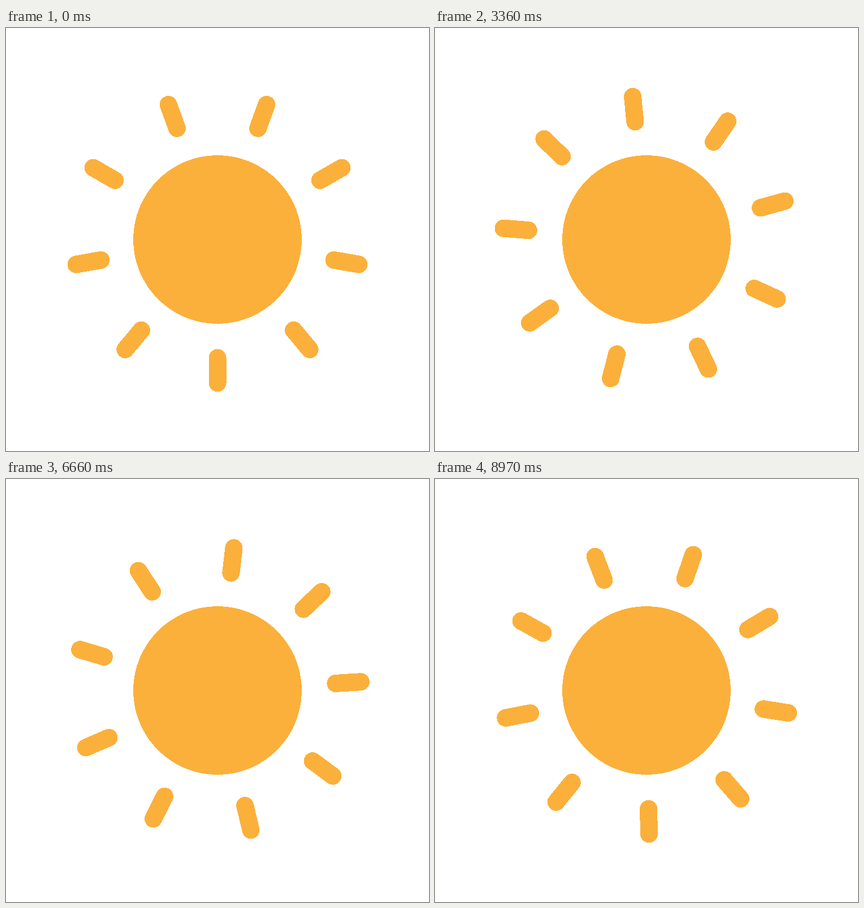
These frames come from a looping animation (748x748 px, 9000 ms). An HTML page:

```html
<!DOCTYPE html>
<html lang="en">
<head>
<meta charset="utf-8">
<title>Sun</title>
<style>
  html, body { margin: 0; width: 100%; height: 100%; overflow: hidden; background: #fff; }
  svg { display: block; width: 100%; height: 100%; }
</style>
</head>
<body>
<svg viewBox="-374 -374 748 748" fill="#fbb03b" stroke="#fbb03b" shape-rendering="crispEdges">
  <circle r="149" stroke="none"/>
  <g id="rays" stroke-width="31" stroke-linecap="round"></g>
</svg>
<script>
  const RAYS = 9, STEP = 30, STEPS = 300;
  const rays = document.getElementById('rays');

  rays.innerHTML = Array.from({ length: RAYS }, (_, i) =>
    `<path d="M0 209.3V253.8" transform="rotate(${i * 360 / RAYS})"/>`).join('');

  // The turn advances in 30 ms steps, from 0 to 359 degrees per loop.
  const start = performance.now();
  function draw(now) {
    const step = Math.floor(Math.max(0, now - start) / STEP) % STEPS;
    rays.setAttribute('transform', `rotate(${step * 359 / (STEPS - 1)})`);
    requestAnimationFrame(draw);
  }
  draw(start);
</script>
</body>
</html>
```
